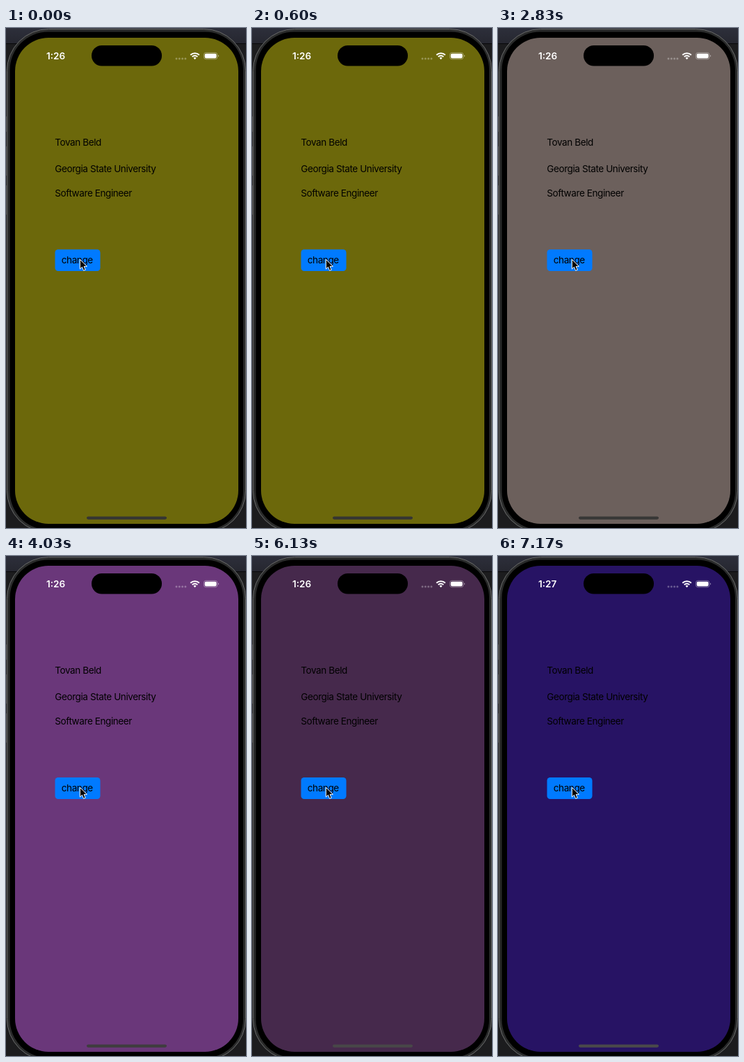
An HTML page for the animation above (8000 ms loop, 345 by 718 pixels).

```html
<!DOCTYPE html>
<html lang="en">
<head>
<meta charset="utf-8">
<title>Colour changer</title>
<style>
  html, body { margin: 0; width: 100%; height: 100%; overflow: hidden; background: #1c1c1e; }
  svg { display: block; width: 345px; height: 718px; }
  text { font: 13.5px Inter, "Liberation Sans", sans-serif; letter-spacing: -0.4px; }
  #clock { font-weight: 600; letter-spacing: 0; fill: #fff; }
</style>
</head>
<body>
<svg viewBox="0 0 345 718">
  <defs>
    <linearGradient id="bar" x2="0" y2="1">
      <stop offset="0" stop-color="#2d2f3b"/>
      <stop offset="1" stop-color="#262730"/>
    </linearGradient>
  </defs>

  <!-- desktop behind the phone -->
  <rect width="345" height="718" fill="#1c1c1e"/>
  <rect width="345" height="22" fill="url(#bar)"/>
  <rect y="22" width="345" height="1" fill="#08080a"/>

  <!-- phone body -->
  <g fill="#3a3a3b">
    <rect y="127" width="1.5" height="22"/>
    <rect y="170" width="1.5" height="42"/>
    <rect y="226" width="1.5" height="42"/>
  </g>
  <rect x="1.5" y="1.5" width="343" height="723" rx="60" fill="#2a2b2b" stroke="#6b6c6c"/>
  <rect x="5.5" y="5.5" width="335.5" height="715" rx="55" fill="#000"/>
  <rect id="screen" x="13" y="14" width="321" height="698" rx="48"/>
  <rect x="123" y="25" width="101" height="29.5" rx="14.75" fill="#000"/>

  <!-- status bar -->
  <text id="clock" x="58" y="45"></text>
  <g fill="#fff" fill-opacity=".3">
    <circle cx="245" cy="44" r="1.5"/>
    <circle cx="249.3" cy="44" r="1.5"/>
    <circle cx="253.6" cy="44" r="1.5"/>
    <circle cx="257.9" cy="44" r="1.5"/>
  </g>
  <g fill="none" stroke="#fff" stroke-width="2">
    <path d="M265.2 38.8a8.8 8.8 0 0 1 12.6 0"/>
    <path d="M267.7 41.4a5.3 5.3 0 0 1 7.6 0"/>
  </g>
  <path d="M271.5 45.2l-2-2.2a2.9 2.9 0 0 1 4 0z" fill="#fff"/>
  <rect x="284.4" y="35.4" width="19.4" height="9.4" rx="3" fill="none" stroke="#fff" stroke-opacity=".4" stroke-width=".9"/>
  <rect x="285.7" y="36.7" width="16.8" height="6.8" rx="1.9" fill="#fff"/>
  <path d="M304.9 38.6q1.2.5 1.2 1.5t-1.2 1.5z" fill="#fff" fill-opacity=".45"/>

  <!-- app content -->
  <text x="70.3" y="168.8">Tovan Beld</text>
  <text x="70.3" y="207.2">Georgia State University</text>
  <text x="70.3" y="241.6">Software Engineer</text>
  <rect x="70.5" y="318" width="65" height="31" rx="4.5" fill="#007aff"/>
  <text x="79.8" y="338">change</text>
  <rect id="home" x="116" y="701.5" width="115" height="4.2" rx="2.1"/>

  <!-- pointer -->
  <path d="M106.3 332.3v13.8l3.1-2.9 2.2 5.2 2.6-1.1-2.2-5h4.4z" fill="#000" stroke="#fff" stroke-linejoin="round"/>
</svg>
<script>
  const LOOP = 8000;
  // start ms, background, home bar, clock
  const steps = [
    [0, "#6c680b", "#353533", "1:26"],
    [1790, "#614c70", "#3c3b3c", "1:26"],
    [2830, "#6c605c", "#383736", "1:26"],
    [4030, "#6a377a", "#3e3d3e", "1:26"],
    [5080, "#5a1e2e", "#494748", "1:26"],
    [6130, "#46294c", "#484748", "1:26"],
    [7170, "#271364", "#4a494b", "1:27"]
  ];
  const [screenBox, homeBar, clockText] =
    ["screen", "home", "clock"].map(id => document.getElementById(id));
  const start = performance.now();
  let shown;

  function draw() {
    const t = (performance.now() - start) % LOOP;
    const step = steps.findLast(s => s[0] <= t);
    if (step !== shown) {
      shown = step;
      screenBox.setAttribute("fill", step[1]);
      homeBar.setAttribute("fill", step[2]);
      clockText.textContent = step[3];
    }
    requestAnimationFrame(draw);
  }
  draw();
</script>
</body>
</html>
```
